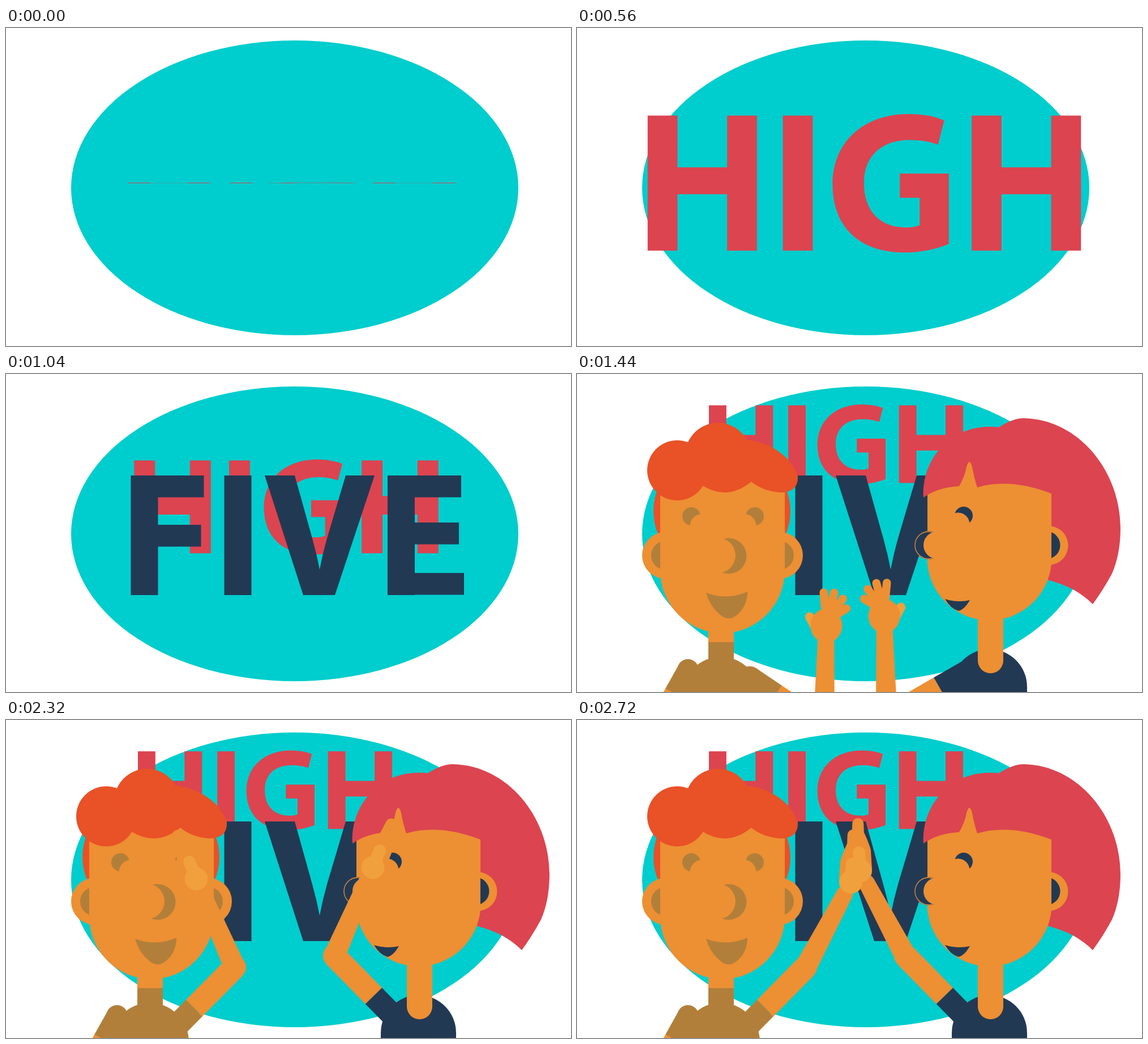
Animation of 998 by 561 pixels, one loop 2800 ms. Source, as an HTML page with a canvas:

```html
<!DOCTYPE html>
<html lang="en">
<head>
<meta charset="utf-8">
<title>High five</title>
<style>
html, body { margin: 0; width: 100%; height: 100%; overflow: hidden; background: #fff; }
canvas { display: block; width: 998px; height: 561px; }
</style>
</head>
<body>
<canvas id="stage" width="998" height="561" role="img" aria-label="HIGH FIVE"></canvas>
<script>
const ctx = document.getElementById('stage').getContext('2d');
const LOOP = 2800, STEP = 80;
const TEAL = '#00cdcd', RED = '#dc4450', NAVY = '#223954', SKIN = '#ed8f33',
      LIGHT = '#f0a03c', BROWN = '#b27f3a', GINGER = '#e95127';

const mix = (a, b, p) => a + (b - a) * p;
const ramp = (t, from, to) => Math.min(1, Math.max(0, (t - from) / (to - from)));
const rad = deg => deg * Math.PI / 180;

// Lettering: stems and bars, with outlines only for G and V
const box = (x, y, w, h) => `M${x} ${y}h${w}v${h}h${-w}Z`;
const stem = x => box(x, 185, 39, 172.5);
const letterH = x => stem(x) + stem(x + 104) + box(x + 38, 251, 67, 34.5);
const letterG =
  'M612 191Q592 183 566 183C505 183 466 220 466 273C466 328 502 360 560 360Q590 360 618 349' +
  'V259H554V290H580V325Q574 328 562 328C528 328 507 307 507 271C507 235 532 216 567 216Q588 216 604 222Z';
const HIGH = new Path2D(letterH(224) + stem(401) + letterG + letterH(648));

const post = x => box(x, 179, 48, 211);
const bar = (x, y, w) => box(x + 47, y, w + 1, 38.5);
const letterF = post(220.5) + bar(220.5, 179, 81) + bar(220.5, 266, 76);
const letterE = post(674) + bar(674, 179, 82) + bar(674, 262, 78) + bar(674, 351, 87);
const letterV = 'M457 179H510L541 290Q549 318 554 345Q559 318 567 290L600 179H651L581 390H525Z';
const FIVE = new Path2D(letterF + post(385.5) + letterV + letterE);

const SIDE_HAND = 'M-21 0L-20 -36Q-18 -46 -9 -68V-83A10 10 0 0 1 11 -83Q13 -50 20 0A20.5 20.5 0 0 1 -21 0Z';

// side is +1 for an arm that reaches right, -1 for one that reaches left
const people = [
  { side: 1, cloth: BROWN, sleeve: 39, shoulder: [305, 536], low: [436, 624], high: [404, 436] },
  { side: -1, cloth: NAVY, sleeve: 55, shoulder: [688, 526], low: [547, 607], high: [580, 416] }
];

function fill(color, shape) {
  ctx.fillStyle = color;
  ctx.fill(typeof shape === 'string' ? new Path2D(shape) : shape);
}
function oval(color, x, y, rx, ry = rx) {
  ctx.fillStyle = color;
  ctx.beginPath();
  ctx.ellipse(x, y, rx, ry, 0, 0, 7);
  ctx.fill();
}
function line(color, width, x1, y1, x2, y2, cap = 'butt') {
  ctx.strokeStyle = color;
  ctx.lineWidth = width;
  ctx.lineCap = cap;
  ctx.beginPath();
  ctx.moveTo(x1, y1);
  ctx.lineTo(x2, y2);
  ctx.stroke();
}
// A dark disc partly covered by a skin-coloured one
function crescent(color, x, y, r, dx, dy, bite) {
  oval(color, x, y, r);
  oval(SKIN, x + dx, y + dy, bite);
}

function drawWords(t) {
  const grow = ramp(t, 0, 320), pop = ramp(t, 320, 560),
        settle = ramp(t, 560, 720), rise = ramp(t, 960, 1280);
  const sx = 1.02 - .124 * grow + .454 * pop - .35 * settle - .208 * rise;
  const sy = .006 + .674 * grow + .7 * pop - .38 * settle - .206 * rise;
  ctx.save();
  ctx.transform(sx, 0, .151 * (grow - pop), sy,
    504.5 + 3 * grow - 50 * rise, 273.3 - 2.3 * settle - 147.5 * rise);
  ctx.translate(-507.5, -271);
  fill(RED, HIGH);
  ctx.restore();

  if (t < 640) return;
  const open = mix(.067, 1, ramp(t, 640, 960));
  ctx.save();
  ctx.translate(516 - 1.5 * open, 286.5 - 2 * open);
  ctx.scale(mix(.5, 1, open), open);
  ctx.translate(-514.5, -284.5);
  fill(NAVY, FIVE);
  ctx.restore();
}

// Straight cheeks ending in a half-round chin
const face = (left, right, top, jaw) =>
  fill(SKIN, `M${left} ${top}H${right}V${jaw}A110 110 0 0 1 ${left} ${jaw}Z`);

function drawBoy() {
  line(SKIN, 38, 196, 523, 150, 605);
  oval(BROWN, 196, 522, 19);
  line(BROWN, 38, 196, 523, 173, 564);
  oval(BROWN, 254, 568, 69);
  line(BROWN, 45, 254.5, 473, 254.5, 540);
  line(SKIN, 45, 254.5, 420, 254.5, 473);
  oval(GINGER, 256, 242, 121, 112);
  for (const side of [-1, 1]) {
    oval(SKIN, 257 + side * 100.5, 320, 41.5);
    oval(BROWN, 257 + side * 100.5, 320, 25.5);
  }
  face(147, 367, 190, 347);
  oval(GINGER, 177, 170, 53);
  oval(GINGER, 249, 144, 58);
  fill(GINGER, 'M200 120L222 197Q266 224 308 190L302 116Z');
  fill(GINGER, 'M300 116C345 120 381 150 390 180C391 200 380 209 358 209Q327 206 308 190L270 160Z');
  for (const side of [-1, 1]) crescent(BROWN, 258 + side * 56, 251, 16, -side * 18.5, 17, 21);
  crescent(BROWN, 268, 321, 31.5, -19, -1, 31);
  fill(BROWN, 'M228 386Q265 400 301 384Q301 407 286 422Q268 440 251 423Q235 410 228 386Z');
}

function drawGirl() {
  fill(RED, 'M680 120L730 93L745 94C766 81 778 78 790 78C885 80 960 170 960 272C960 305 954 332 945 352' +
            'Q930 380 911 406Q881 376 834 364L700 300Z');
  oval(NAVY, 728.5, 552, 66.5);
  fill(NAVY, box(662, 552, 133, 9));
  oval(SKIN, 833, 302.5, 34.5);
  oval(NAVY, 829, 302, 24.5);
  line(SKIN, 45, 730.5, 420, 730.5, 505.5, 'round');
  face(619, 838, 180, 335);
  fill(RED, 'M612 218C608 150 660 92 730 93L747 94L838 130V211Q765 183 707 200L674 198Q637 200 612 218Z');
  fill(SKIN, 'M673 201Q685 182 688 164Q693 146 698 164Q702 186 708 203Z');

  // Nose
  ctx.save();
  ctx.clip(new Path2D(box(590, 270, 40, 64)));
  oval(NAVY, 621, 302, 25);
  ctx.strokeStyle = SKIN;
  ctx.lineWidth = 1.3;
  ctx.beginPath();
  ctx.arc(621, 302, 24, 0, 7);
  ctx.stroke();
  ctx.restore();
  oval(SKIN, 636, 302, 24);

  crescent(NAVY, 683, 250, 16, -10, 15, 20.5);
  fill(NAVY, 'M650 397Q672 404 694 399Q684 416 674 418Q660 414 650 397Z');
}

function openHand() {
  line(LIGHT, 16, -30, -15, -17, 8, 'round');
  for (let i = 0; i < 4; i++) {
    const angle = rad(18 * i - 6), len = 60 - 2.5 * (i - .7) ** 2;
    line(SKIN, 14.5, 0, -8, Math.sin(angle) * len, -Math.cos(angle) * len, 'round');
  }
  oval(SKIN, 0, 0, 28, 30);
}
function thumbSide() {
  oval(LIGHT, 0, 0, 20.5);
  line(LIGHT, 22, 0, 0, 1, -32, 'round');
}

// Both arms share the same angles, mirrored
function armPose(person, t) {
  const lift = ramp(t, 1440, 1920);
  const angle = 1.4 - 25 * ramp(t, 1920, 2320) + 51.6 * ramp(t, 2320, 2480);
  const [ex, ey] = person.low.map((v, i) => mix(v, person.high[i], lift));
  const reach = mix(180, 170, lift), dx = person.side * Math.sin(rad(angle)), dy = -Math.cos(rad(angle));
  return {
    ex, ey, dx, dy, reach,
    sleeve: mix(55, person.sleeve, lift),
    tilt: person.side * rad(Math.min(angle, 2))
  };
}
function atHand(person, pose, draw) {
  ctx.save();
  ctx.translate(pose.ex + pose.dx * pose.reach, pose.ey + pose.dy * pose.reach);
  ctx.rotate(pose.tilt);
  ctx.scale(person.side, 1);
  draw();
  ctx.restore();
}
function drawArm(person, pose) {
  const [sx, sy] = person.shoulder, { ex, ey, dx, dy } = pose;
  const part = pose.sleeve / Math.hypot(ex - sx, ey - sy);
  const hx = mix(sx, ex, part), hy = mix(sy, ey, part);
  line(SKIN, 41, hx, hy, ex, ey);
  oval(person.cloth, sx, sy, 20.5);
  line(person.cloth, 41, sx, sy, hx, hy);
  oval(SKIN, ex, ey, 20);

  // Forearm, tapering to the wrist
  const wrist = pose.reach - 24;
  ctx.save();
  ctx.transform(-dy, dx, -dx, -dy, ex, ey);
  fill(SKIN, `M-19 0L-14.5 ${-wrist}H14.5L19 0Z`);
  oval(SKIN, 0, -wrist, 14.5);
  ctx.restore();
}
function drawArms(t) {
  const open = t <= 1920;
  const poses = people.map(p => armPose(p, t));
  people.forEach((p, i) => {
    drawArm(p, poses[i]);
    atHand(p, poses[i], open ? openHand : () => fill(SKIN, SIDE_HAND));
  });
  if (!open) people.forEach((p, i) => atHand(p, poses[i], thumbSide));
}

// Rays thrown out by the clap
function drawBurst(t) {
  const p = (t - 2480) / 80, inner = 150 + 165 * p, outer = 256 + 364 * p;
  for (let i = 0; i < 16; i++) {
    const c = Math.cos(rad(i * 22.5)), s = Math.sin(rad(i * 22.5));
    line(LIGHT, 6, 486 + c * inner, 240 + s * inner, 486 + c * outer, 240 + s * outer);
  }
}

function draw(t) {
  ctx.fillStyle = '#fff';
  ctx.fillRect(0, 0, 998, 561);
  oval(TEAL, 510, 282, 395, 260);
  drawWords(t);
  if (t >= 1440) {
    drawBoy();
    drawGirl();
    drawArms(t);
  }
  if (t >= 2480 && t < 2720) drawBurst(t);
}

const start = performance.now();
function tick() {
  const t = Math.max(0, performance.now() - start) % LOOP;
  draw(Math.floor(t / STEP) * STEP);
  requestAnimationFrame(tick);
}
tick();
</script>
</body>
</html>
```
